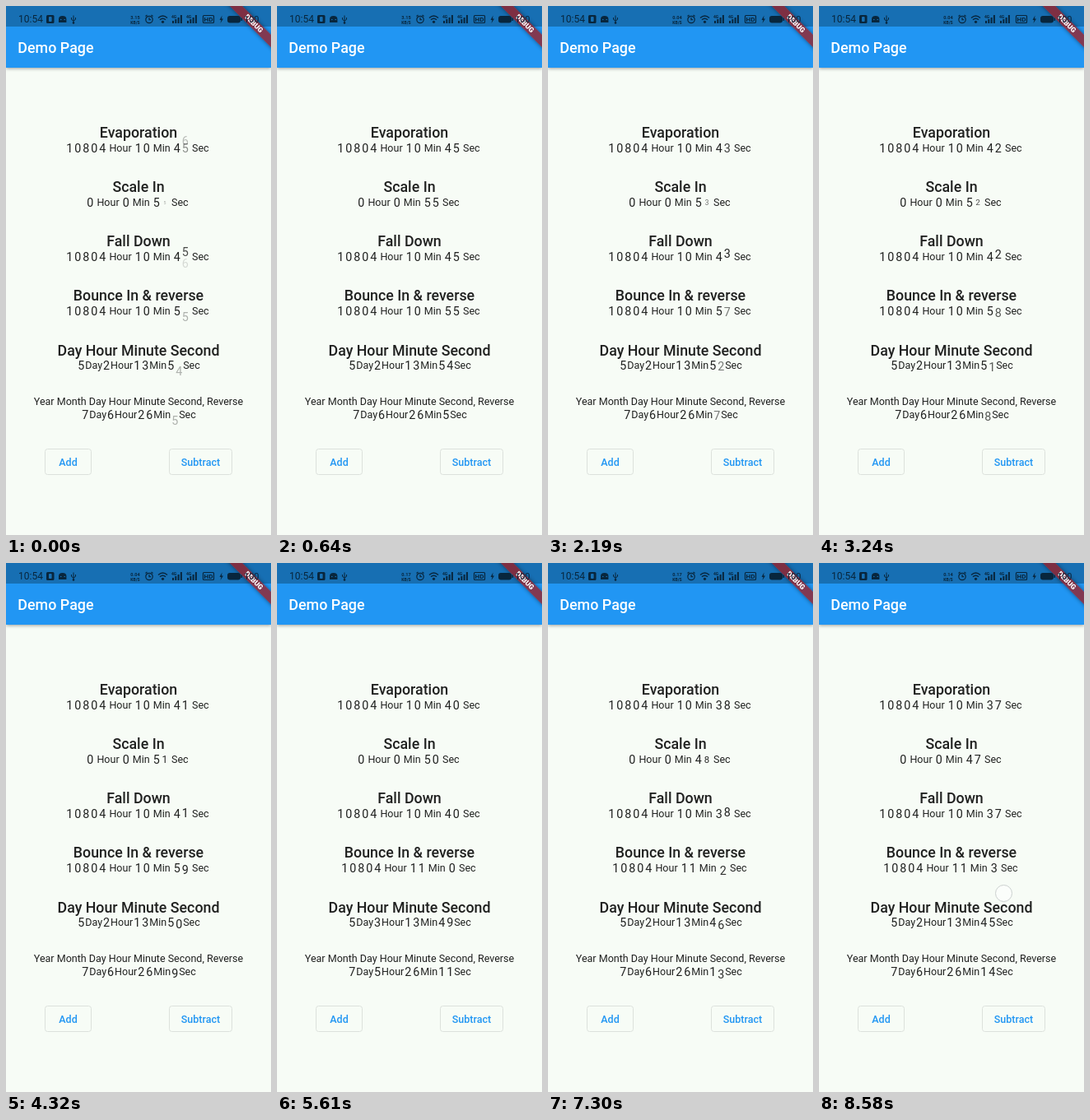
Animation, 322 px wide and 643 px high, one loop 8.61 s. Source, as an HTML page:

```html
<!DOCTYPE html>
<html lang="en">
<head>
<meta charset="utf-8">
<title>Countdown demo</title>
<style>
  html, body { margin: 0; width: 100%; height: 100%; overflow: hidden; }
  body {
    position: relative; background: #f7fcf6; color: #202120;
    font: 12.52px/16px Roboto, "Noto Sans", sans-serif;
  }
  #bar {
    position: absolute; left: 0; top: 0; width: 322px; height: 75px;
    background: linear-gradient(#176fb3 25px, #2196f3 25px);
    box-shadow: 0 1px 4px rgba(0, 0, 0, .38);
  }
  #bar h1 {
    position: absolute; left: 14.3px; top: 39px; margin: 0;
    font-size: 17.9px; line-height: 24px; font-weight: 500; color: #fff;
  }
  #debug {
    position: absolute; left: 256px; top: 15.5px; width: 90px; height: 11px;
    transform: rotate(45deg); background: rgba(160, 28, 32, .76);
    box-shadow: 0 0 5px rgba(0, 0, 0, .45); color: #fff;
    font-size: 8.6px; line-height: 11px; font-weight: 900; text-align: center;
  }
  #status { position: absolute; left: 0; top: 0; }
  .head, .row { position: absolute; left: 0; width: 322px; white-space: pre; }
  .head { text-align: center; font-size: 17.8px; line-height: 24px; font-weight: 500; }
  .head.small { font-size: 12.52px; line-height: 16px; font-weight: 400; }
  .row { display: flex; justify-content: center; align-items: center; height: 16px; }
  .digit { position: relative; width: 10px; height: 16px; font-size: 14.3px; text-align: center; }
  .digit i { position: absolute; inset: 0; font-style: normal; }
  .button {
    position: absolute; top: 538px; height: 32px; box-sizing: border-box;
    border: 1px solid #dce1dc; border-radius: 3.5px;
    color: #2196f3; font-weight: 500; line-height: 31px; text-align: center;
  }
  #ring {
    position: absolute; width: 21px; height: 21px; margin: -10.5px; box-sizing: border-box;
    border: 1.6px solid #cbd0cf; border-radius: 50%; background: rgba(255, 255, 255, .5);
  }
</style>
</head>
<body>
<div id="bar"><h1>Demo Page</h1></div>
<div id="debug">DEBUG</div>

<svg id="status" width="322" height="25" fill="#08263d" stroke="none" font-family="Roboto, sans-serif">
  <text x="15" y="20.3" font-size="12">10:54</text>
  <rect x="49" y="11" width="9.5" height="10" rx="1.5"/>
  <rect x="52" y="13" width="3.6" height="6" rx="1" fill="#176fb3"/>
  <path d="M64 20v-4q0-4 4.700-4t4.700 4v4z"/>
  <path d="M66 16.500h1.500m3 0h1.500" stroke="#176fb3"/>
  <path d="M82 11.500v9M79.500 14v2.500l2.500 1.500 2.500-1.500v-2.500" fill="none" stroke="#08263d"/>
  <circle cx="82" cy="20.500" r="1.300"/>
  <g font-size="5.6" font-weight="700" text-anchor="middle">
    <text id="speed" x="157" y="15.500">3.15</text>
    <text x="157" y="21.500" font-size="5">KB/S</text>
  </g>
  <g fill="none" stroke="#08263d" stroke-width="1.2">
    <circle cx="174" cy="16.500" r="4.200"/>
    <path d="M174 14v2.700h2M169.500 12.500l2-1.500m7 1.500-2-1.500"/>
    <path d="M185 14.500q5.500-5 11 0M187 16.800q3.500-3.200 7 0" stroke-width="1.500"/>
    <rect x="239.500" y="11.500" width="13" height="9" rx="1"/>
  </g>
  <circle cx="190.500" cy="19.300" r="1.600"/>
  <g id="bars">
    <path d="M202 21v-3h2v3zm3.300 0v-5h2v5zm3.300 0v-7h2v7zm3.300 0v-10h2v10z"/>
    <text x="201" y="15" font-size="5" font-weight="700">4G</text>
  </g>
  <use href="#bars" x="18"/>
  <text x="246" y="19" font-size="8" font-weight="700" text-anchor="middle">HD</text>
  <path d="M262.500 11.500l-3 5.500h2l-1 4 3.500-5.500h-2z"/>
  <rect x="269" y="12" width="16" height="8.500" rx="3"/>
  <rect x="285.500" y="14.500" width="1.500" height="3.500"/>
  <text x="289" y="20" font-size="11">100</text>
</svg>

<div class="button" id="add" style="left:47px;width:57px">Add</div>
<div class="button" id="subtract" style="left:198px;width:77px">Subtract</div>
<div id="ring"></div>

<script>
const LOOP = 8610, MOVE = 500, ADD = 4750, SUBTRACT = 6550;
const ticks = [-100, 1045, 2015, 3020, 4020, 5020, 6020, 7028, 8020];
const steps = [...ticks, ADD, SUBTRACT].sort((a, b) => a - b);
const $ = id => document.getElementById(id);
const ring = $('ring');

const easeOut = p => 1 - (1 - p) ** 2;
function bounceOut(p) {
  const k = 7.5625, d = 2.75;
  if (p < 1 / d) return k * p * p;
  if (p < 2 / d) return k * (p - 1.5 / d) ** 2 + .75;
  if (p < 2.5 / d) return k * (p - 2.25 / d) ** 2 + .9375;
  return k * (p - 2.625 / d) ** 2 + .984375;
}

function glyph(char, alpha, y = 0, scale = 1) {
  if (alpha <= 0 || !char.trim()) return '';
  const a = Math.min(1, alpha).toFixed(3);
  return `<i style="opacity:${a};transform:translateY(${y.toFixed(2)}px) scale(${scale.toFixed(3)})">${char}</i>`;
}

// Each effect draws the new and the old digit at progress p.
const effects = {
  evaporate: (now, old, p) =>
    glyph(now, p * 2.5) + glyph(old, 1 - 3.5 * p, -24 * easeOut(p)),
  scale: (now, old, p) => glyph(now, p * 1.8, 0, easeOut(p)),
  fall: (now, old, p) =>
    glyph(now, p * 4, -9 * (1 - p) ** 2) + glyph(old, 1 - 4.2 * p, 22 * easeOut(p)),
  bounce: (now, old, p) => glyph(now, p * 1.7, 10 * (1 - bounceOut(p)))
};

const long = (min, sec) => `10804 Hour ${min} Min ${sec} Sec `;
const shifted = k => k > 4 && k < 8 ? 1 : 0;
const rows = [
  { title: 'Evaporation', y: 172.5, effect: 'evaporate', times: ticks, text: k => long(10, 45 - k) },
  { title: 'Scale In', y: 238.5, effect: 'scale', times: ticks, text: k => `0 Hour 0 Min ${55 - k} Sec ` },
  { title: 'Fall Down', y: 304.5, effect: 'fall', times: ticks, text: k => long(10, 45 - k) },
  { title: 'Bounce In & reverse', y: 370.5, effect: 'bounce', times: ticks,
    text: k => long(k > 4 ? 11 : 10, (55 + k) % 60) },
  { title: 'Day Hour Minute Second', y: 437, effect: 'bounce', times: steps,
    text: k => `5Day${2 + shifted(k)}Hour13Min${54 - k + (k > 4)}Sec` },
  { title: 'Year Month Day Hour Minute Second, Reverse', y: 497, effect: 'bounce', times: steps, small: true,
    text: k => `7Day${6 - shifted(k)}Hour26Min${5 + k - (k > 7)}Sec` }
];

function block(className, top) {
  const el = document.createElement('div');
  el.className = className;
  el.style.top = top + 'px';
  document.body.insertBefore(el, ring);
  return el;
}

for (const row of rows) {
  const head = row.small ? block('head small', row.y - 24.5) : block('head', row.y - 30.5);
  head.textContent = row.title;
  row.el = block('row', row.y - 8);
}

function drawRow(row, t) {
  const k = row.times.filter(s => s <= t).length - 1;
  const p = Math.min(1, (t - row.times[k]) / MOVE);
  const before = row.text(k - 1).match(/\d+/g);
  let n = 0;
  const html = row.text(k).match(/\d+|\D+/g).map(part => {
    if (!/\d/.test(part)) return `<span>${part}</span>`;
    const old = before[n++].padStart(part.length).slice(-part.length);
    return [...part].map((c, i) => {
      const body = c === old[i] || p === 1 ? glyph(c, 1) : effects[row.effect](c, old[i], p);
      return `<span class="digit">${body}</span>`;
    }).join('');
  }).join('');
  if (html !== row.html) row.el.innerHTML = row.html = html;
}

function press(button, t, at) {
  const a = Math.max(0, 1 - Math.abs(t - at) / 200) * .12;
  button.style.background = `rgba(33, 150, 243, ${a})`;
}

const touches = [
  { from: ADD - 90, to: ADD + 30, x: 76, y: 554 },
  { from: SUBTRACT - 90, to: SUBTRACT + 30, x: 236, y: 554 },
  { from: 8490, to: LOOP, x: 224.5, y: 401 }
];

function draw(t) {
  rows.forEach(row => drawRow(row, t));
  $('speed').textContent = t < 2000 ? '3.15' : t < 5000 ? '0.04' : t < 8000 ? '0.17' : '0.14';
  press($('add'), t, ADD);
  press($('subtract'), t, SUBTRACT);
  const touch = touches.find(s => t >= s.from && t < s.to);
  ring.style.display = touch ? 'block' : 'none';
  if (touch) {
    ring.style.left = touch.x + 'px';
    ring.style.top = touch.y + 'px';
  }
}

const start = performance.now();
function frame() {
  draw((performance.now() - start) % LOOP);
  requestAnimationFrame(frame);
}
frame();
</script>
</body>
</html>
```
